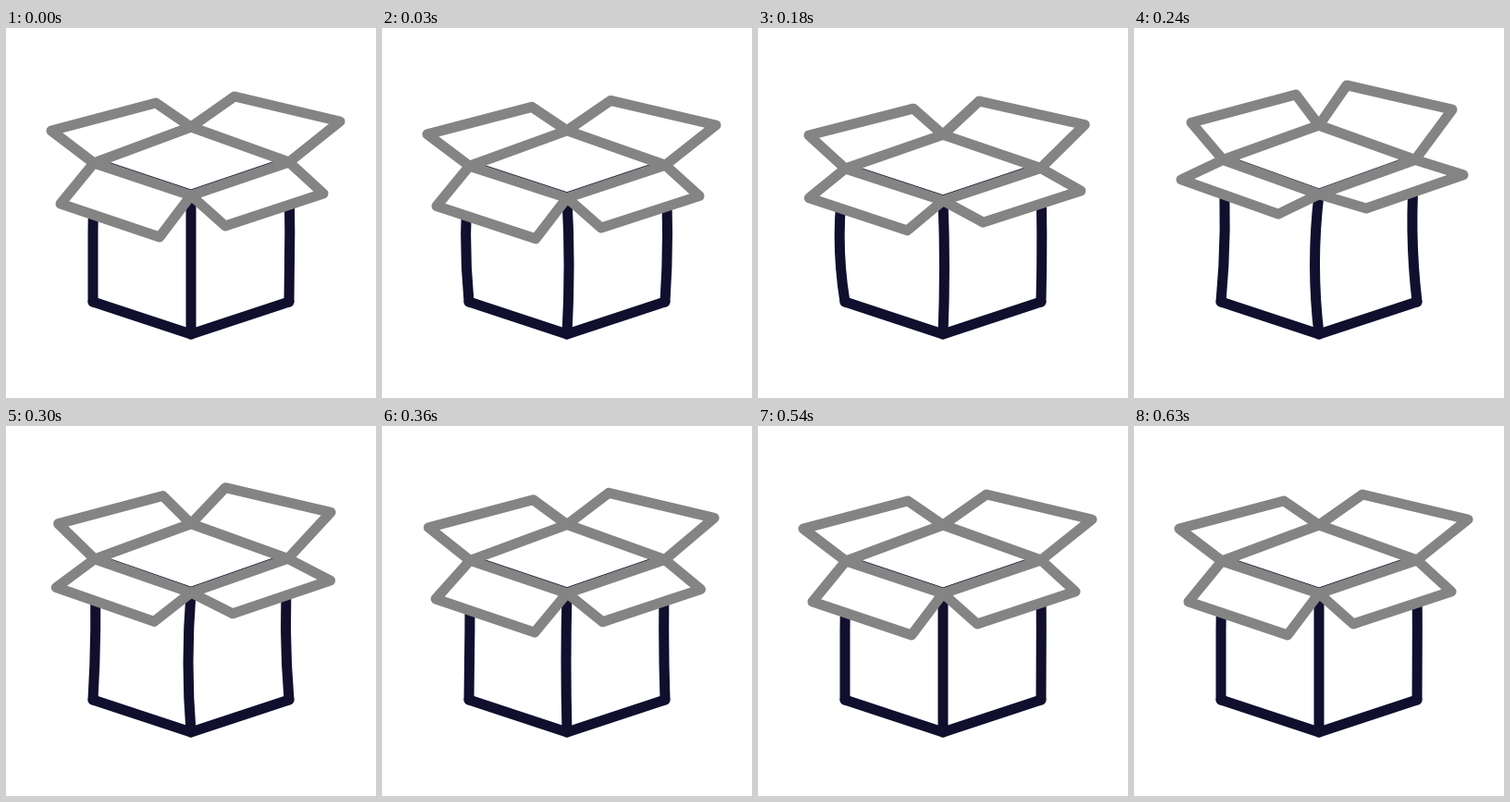
Write an HTML page that moves like this. It is 400 by 400 pixels and loops after 0.69 s.

```html
<!DOCTYPE html>
<html lang="en">
<head>
<meta charset="utf-8">
<title>Springy box</title>
<style>
  html, body { margin: 0; width: 100%; height: 100%; overflow: hidden; background: #fff; }
  svg { display: block; width: 100vw; height: 100vh; }
  path { stroke-width: 11; stroke-linecap: round; stroke-linejoin: round; }
  .body { stroke: #100f2e; fill: none; }
  .flap { stroke: #848484; fill: #fff; }
</style>
</head>
<body>
<svg viewBox="0 0 400 400">
  <path class="body" id="base" d="M94 296L200 331L306 296"/>
  <path class="body" id="legs"/>
  <path class="body" id="rim"/>
  <path class="flap" id="lid"/>
</svg>
<script>
const LOOP = 690, STEP = 30, FLOOR = 331;
const times = [0, 90, 180, 240, 360, 450];
const tracks = {
  squash: [0, 1, 0.56, -0.12, -0.03, 0],
  swing: [0, 0, 0.46, 1, 0.11, 0],
  left: [-0.5, -12.5, -6, 3, 0.3, -0.5],
  mid: [0, 8, 1.5, -4.5, -1, 0],
  right: [0.8, 7, 1, -4, -1.2, 0.3]
};
// x, y at rest, then the offset at full swing
const joints = {
  back: [200, 107, 0, 0], west: [95, 146, 1, -2],
  front: [200, 181, 0, 0], east: [306, 145, -2, -1],
  a: [49, 111, 13, -7], b: [162, 81, 13, -7],
  c: [247, 74, -17, -10], d: [361, 101, -17, -11],
  e: [59, 190, -8, -25], f: [166, 226, -10, -24],
  g: [237, 214, 14, -18], h: [343, 179, 13, -19]
};
const el = id => document.getElementById(id);

// Monotone cubic curve through the keys
function sample(keys, t) {
  const last = times.length - 1;
  if (t >= times[last]) return keys[last];
  const slope = i => (keys[i + 1] - keys[i]) / (times[i + 1] - times[i]);
  const tangent = i => {
    if (i === 0 || i === last) return 0;
    const p = slope(i - 1), q = slope(i);
    return p * q > 0 ? 2 * p * q / (p + q) : 0;
  };
  let i = 0;
  while (t >= times[i + 1]) i++;
  const span = times[i + 1] - times[i], u = (t - times[i]) / span;
  const ease = u * u * (3 - 2 * u);
  return keys[i] + (keys[i + 1] - keys[i]) * ease
    + span * u * (1 - u) * ((1 - u) * tangent(i) - u * tangent(i + 1));
}

function draw(t) {
  const v = {}, p = {};
  for (const k in tracks) v[k] = sample(tracks[k], t);
  for (const k in joints) {
    const [x, y, dx, dy] = joints[k];
    p[k] = [x + dx * v.swing, FLOOR - (FLOOR - y) * (1 - 0.067 * v.squash) + dy * v.swing];
  }
  p.west[0] -= 2 * v.squash;
  p.east[0] += v.squash;

  const leg = (top, x, y, bend) =>
    `M${top}Q${(top[0] + x) / 2 + 2 * bend} ${(top[1] + y) / 2} ${x} ${y}`;
  const poly = names => "M" + names.split(" ").map(n => p[n]).join("L") + "Z";

  el("legs").setAttribute("d", leg(p.west, 94, 296, v.left)
    + leg(p.front, 200, 331, v.mid) + leg(p.east, 306, 296, v.right));
  el("rim").setAttribute("d", "M" + [p.west, p.front, p.east]
    .map(([x, y]) => [x, y - 0.7]).join("L"));
  el("lid").setAttribute("d", ["west a b back", "back c d east",
    "west e f front", "front g h east"].map(poly).join(""));
}

function tick(now) {
  draw(Math.floor(now % LOOP / STEP) * STEP);
  requestAnimationFrame(tick);
}
draw(0);
requestAnimationFrame(tick);
</script>
</body>
</html>
```
